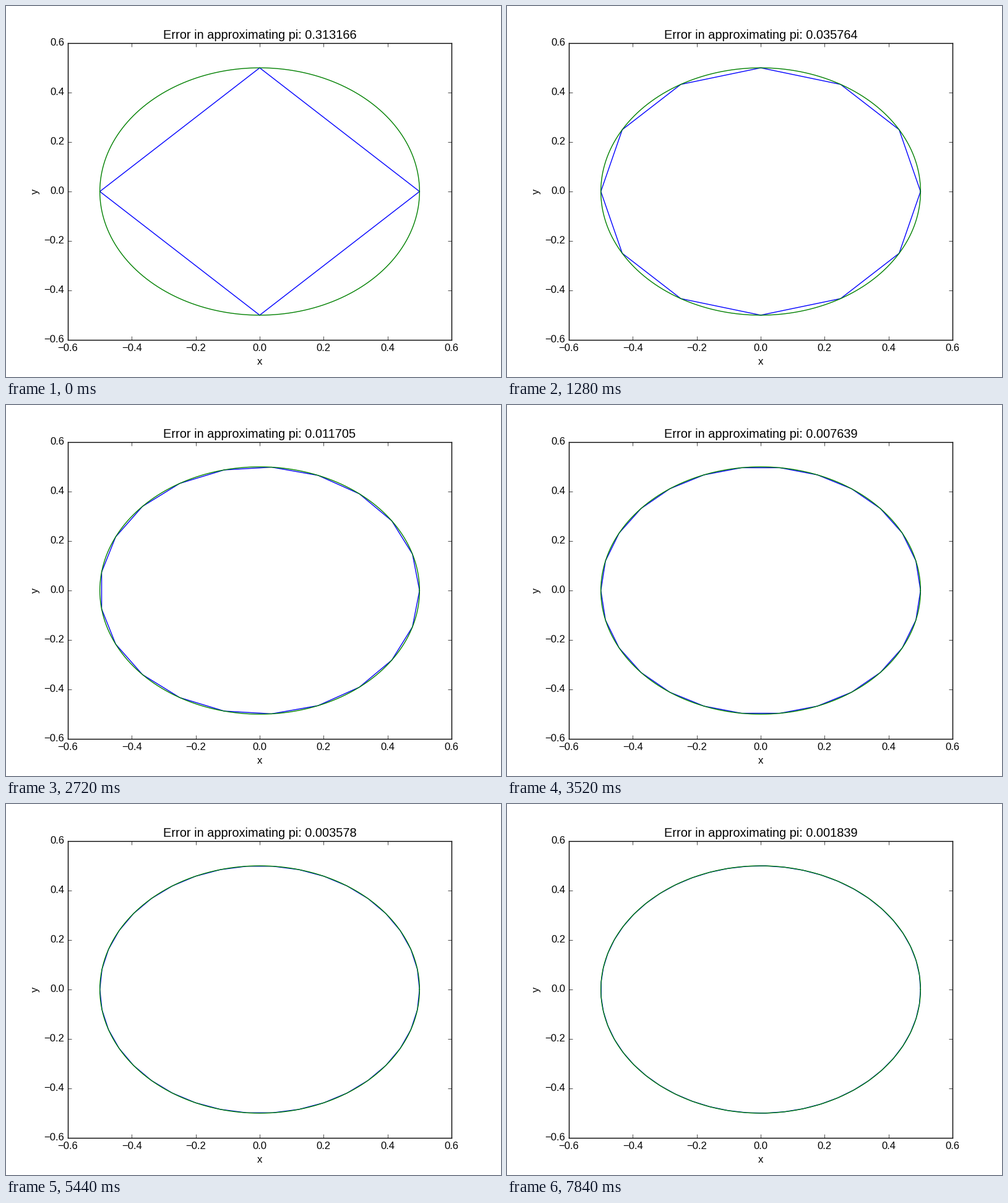
A matplotlib script for the animation above (8000 ms loop, 800 px wide and 600 px high).

```python
import matplotlib.pyplot as plt
import numpy as np
from matplotlib.animation import FuncAnimation

FRAMES, INTERVAL = 50, 160
FIRST_SIDES = 4
RADIUS = 0.5

plt.style.use("classic")
plt.rcParams.update({
    "font.family": "Liberation Sans",
    "figure.facecolor": "white",
    "savefig.dpi": "figure",
})


def ring(sides):
    """Closed regular polygon inscribed in the circle, first vertex on the right."""
    angle = np.linspace(0, 2 * np.pi, sides + 1)
    return RADIUS * np.cos(angle), RADIUS * np.sin(angle)


fig = plt.figure(figsize=(8, 6), dpi=100)
ax = fig.add_axes([0.125, 0.1, 0.775, 0.8])
ticks = np.linspace(-0.6, 0.6, 7).round(1)
ax.set(xlim=(-0.6, 0.6), ylim=(-0.6, 0.6), xticks=ticks, yticks=ticks,
       xlabel="x", ylabel="y")

polygon, = ax.plot([], [], color="b", lw=1)
ax.plot(*ring(1000), color="g", lw=1)
title = ax.set_title("")


def update(frame):
    sides = FIRST_SIDES + frame
    error = np.pi - sides * np.sin(np.pi / sides)
    polygon.set_data(*ring(sides))
    title.set_text(f"Error in approximating pi: {error:.6f}")
    return polygon, title


anim = FuncAnimation(fig, update, frames=FRAMES, interval=INTERVAL,
                     repeat=True, repeat_delay=0)
plt.show()
```
